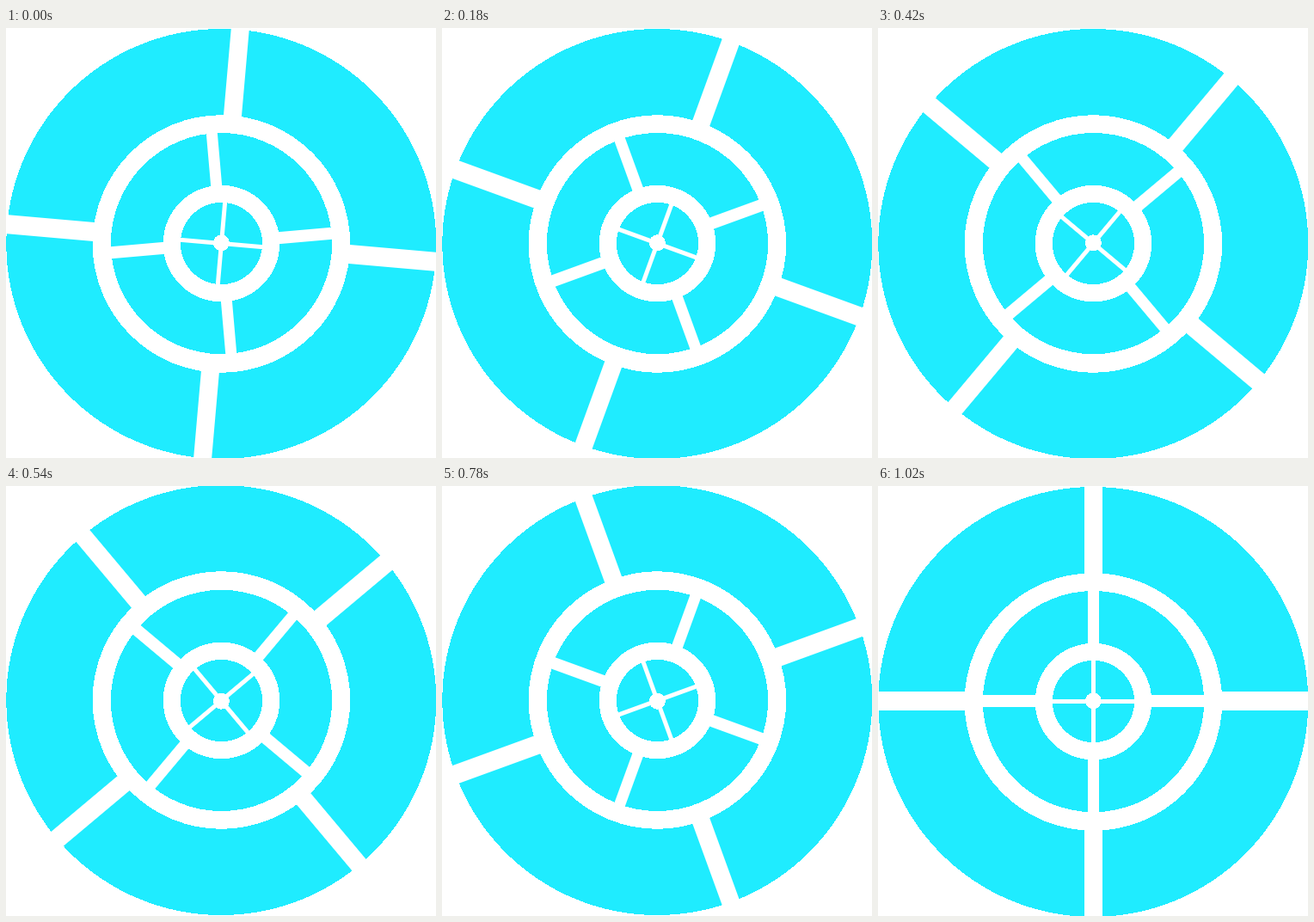
Write an HTML page that moves like this. It is 500 by 500 pixels and loops after 1080 ms.

```html
<!DOCTYPE html>
<html lang="en">
<head>
<meta charset="utf-8">
<title>Turning rings</title>
<style>
html, body { margin: 0; width: 100%; height: 100%; overflow: hidden; background: #fff; }
svg { display: block; width: 100vw; height: 100vh; shape-rendering: crispEdges; }
.ink { fill: #1fecff; }
.gap { fill: #fff; }
#stage { transform-origin: 250px 250px; }
.cross { transform-origin: 250.6px 250.1px; }
</style>
</head>
<body>
<svg viewBox="0 0 500 500"><g id="stage"></g></svg>
<script>
const LOOP = 1080, STEPS = 18, TURN = 5;
const stage = document.getElementById('stage');

function add(parent, tag, attrs) {
  const el = document.createElementNS('http://www.w3.org/2000/svg', tag);
  for (const key in attrs) el.setAttribute(key, attrs[key]);
  return parent.appendChild(el);
}

function disc(cls, cx, cy, r) {
  add(stage, 'circle', { class: cls, cx, cy, r });
}

// Upright and level bars, with their own widths
function cross(reach, upright, level) {
  const g = add(stage, 'g', { class: 'cross' });
  const x = 250.6, y = 250.1;
  add(g, 'rect', { class: 'gap', x: x - upright / 2, y: y - reach, width: upright, height: 2 * reach });
  add(g, 'rect', { class: 'gap', x: x - reach, y: y - level / 2, width: 2 * reach, height: level });
  return g;
}

disc('ink', 250.3, 251, 250);
const outer = cross(256, 20.3, 21.8);
disc('gap', 250.4, 251, 149.8);
disc('ink', 250.5, 250.6, 128.6);
const middle = cross(132, 13, 13.5);
disc('gap', 250.5, 250.6, 67.8);
disc('ink', 250.5, 250.5, 47.6);
const inner = cross(52, 5, 5);
disc('gap', 250.4, 249.8, 9.5);

// The second half of the turn is the first half mirrored top to bottom
function pose(i) {
  const angle = (i + 1) * TURN % 90;
  return angle > 45 ? { angle: 90 - angle, flip: -1 } : { angle, flip: 1 };
}

function play(el, transformAt) {
  const frames = [];
  for (let i = 0; i <= STEPS; i++) {
    frames.push({ offset: i / STEPS, transform: transformAt(pose(i % STEPS)), easing: 'step-end' });
  }
  el.animate(frames, { duration: LOOP, iterations: Infinity });
}

play(stage, p => `scaleY(${p.flip})`);
play(outer, p => `rotate(${p.angle}deg)`);
play(middle, p => `rotate(${-p.angle}deg)`);
play(inner, p => `rotate(${p.angle}deg)`);
</script>
</body>
</html>
```
